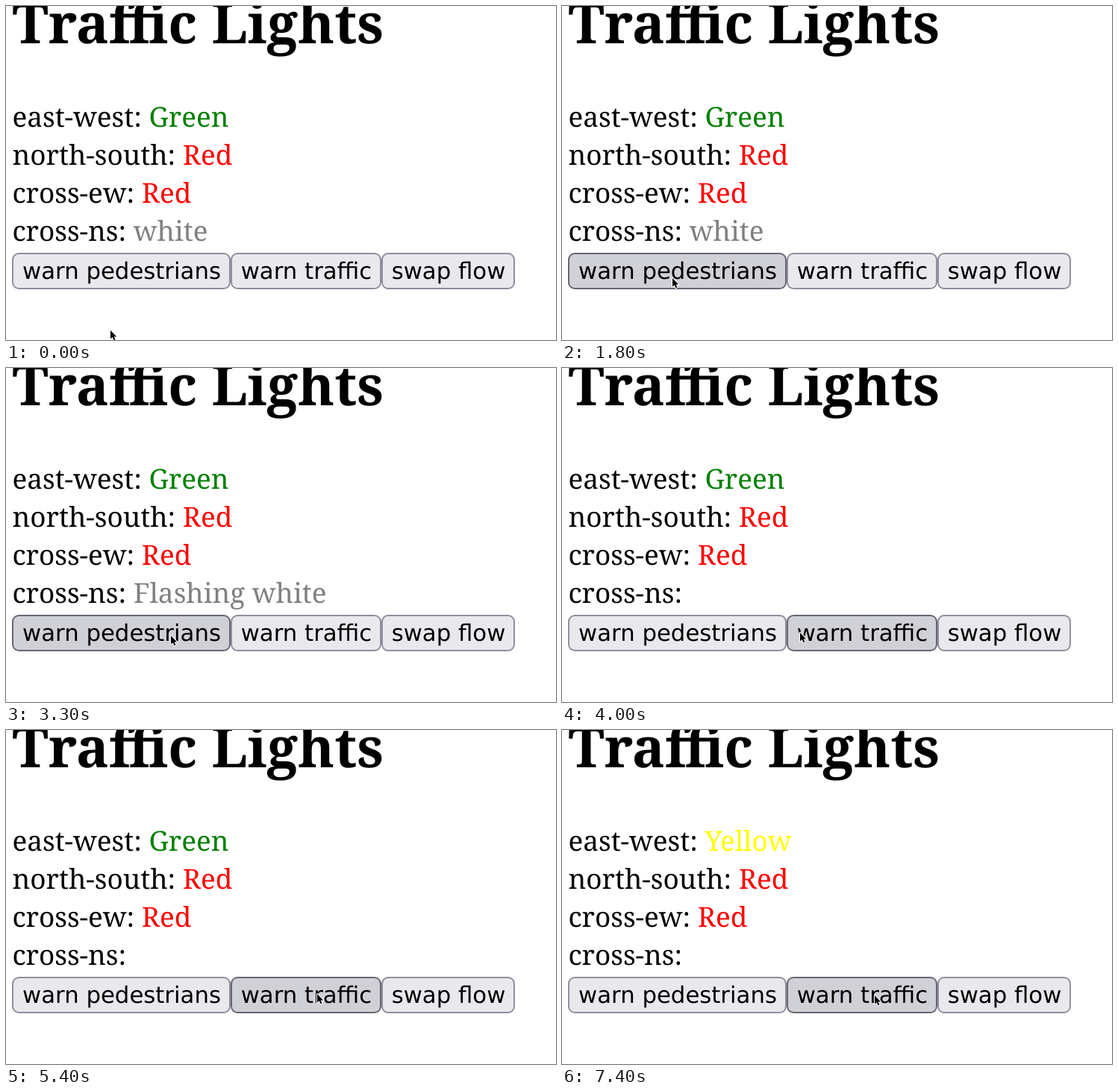
Animation, 737 px wide and 448 px high, one loop 8 s. Source, as an HTML page:

```html
<!DOCTYPE html>
<html lang="en">
<head>
<meta charset="utf-8">
<title>Traffic Lights</title>
<style>
  html, body { margin: 0; width: 100%; height: 100%; overflow: hidden; background: #fff; }
  svg { --zoom: calc(60 / 26); display: block; width: 737px; height: 448px; text-rendering: geometricPrecision; }
  .page { font: calc(16px * var(--zoom)) "Noto Serif", serif; }
  .title { font-size: calc(32px * var(--zoom)); font-weight: bold; }
  .button text { font: calc(13.333px * var(--zoom)) "DejaVu Sans", sans-serif; text-anchor: middle; }
  .button rect { fill: #e9e9ed; stroke: #8f8f9d; stroke-width: 2px; }
  .button.hover rect { fill: #d0d0d7; stroke: #676774; }
  .button.active rect { fill: #b1b1b9; stroke: #484851; }
  #cursor { stroke: #fff; stroke-width: 2px; stroke-linejoin: round; paint-order: stroke; }
</style>
</head>
<body>
<svg viewBox="0 0 737 448">
  <g class="page" transform="translate(8.46 0)">
    <text class="title" y="50">Traffic Lights</text>
    <text y="162">east-west: <tspan id="eastWest"></tspan></text>
    <text y="213">north-south: <tspan fill="red">Red</tspan></text>
    <text y="264">cross-ew: <tspan fill="red">Red</tspan></text>
    <text y="315">cross-ns: <tspan id="crossNs" fill="gray"></tspan></text>
  </g>
  <g id="buttons"></g>
  <path id="cursor" d="M1 1V12.6L3.7 10.2L5.5 14.3L7.4 13.5L5.6 9.4H9.2Z"/>
</svg>
<script>
const LOOP = 8000, STEP = 100, FLASH = 1000;
const WARN_PEDESTRIANS = 2300, WARN_TRAFFIC = 6800;
const byId = id => document.getElementById(id);

const buttons = [
  { label: 'warn pedestrians', left: 8, right: 301, press: WARN_PEDESTRIANS },
  { label: 'warn traffic', left: 301, right: 503, press: WARN_TRAFFIC },
  { label: 'swap flow', left: 503, right: 682 }
];
byId('buttons').innerHTML = buttons.map(({ label, left, right }) =>
  `<g class="button"><rect x="${left + 1}" y="332" width="${right - left - 2}" height="47" rx="8.2"/>
   <text x="${(left + right + 1) / 2}" y="366">${label}</text></g>`).join('');
const buttonNodes = [...document.querySelectorAll('.button')];

// Pointer path: time, x, y
const path = [
  [0, 139, 434], [900, 139, 434], [1500, 146, 363], [1700, 146, 363],
  [1800, 147, 364], [2900, 147, 364], [3300, 220, 358], [4000, 318, 354],
  [4700, 416, 353], [5700, 416, 353], [5800, 418, 355], [LOOP, 418, 355]
];

function pointerAt(t) {
  const i = path.findIndex(key => key[0] > t);
  const [t0, x0, y0] = path[i - 1], [t1, x1, y1] = path[i];
  const p = (t - t0) / (t1 - t0);
  return [Math.round(x0 + (x1 - x0) * p), Math.round(y0 + (y1 - y0) * p)];
}

function crossingText(t) {
  const since = t - WARN_PEDESTRIANS - STEP;
  if (since < 0) return 'white';
  return Math.floor(since / FLASH) % 2 ? '' : 'Flashing white';
}

function draw(now) {
  const t = Math.floor(now % LOOP / STEP) * STEP;
  const [x, y] = pointerAt(t);
  byId('cursor').setAttribute('transform', `translate(${x} ${y})`);

  buttons.forEach(({ left, right, press }, i) => {
    const hover = x >= left && x < right && y >= 331 && y < 380;
    buttonNodes[i].classList.toggle('hover', hover);
    buttonNodes[i].classList.toggle('active', t === press);
  });

  const yellow = t > WARN_TRAFFIC;
  byId('eastWest').textContent = yellow ? 'Yellow' : 'Green';
  byId('eastWest').setAttribute('fill', yellow ? 'yellow' : 'green');
  byId('crossNs').textContent = crossingText(t);
}

const start = performance.now();
function tick() {
  draw(performance.now() - start);
  requestAnimationFrame(tick);
}
tick();
</script>
</body>
</html>
```
